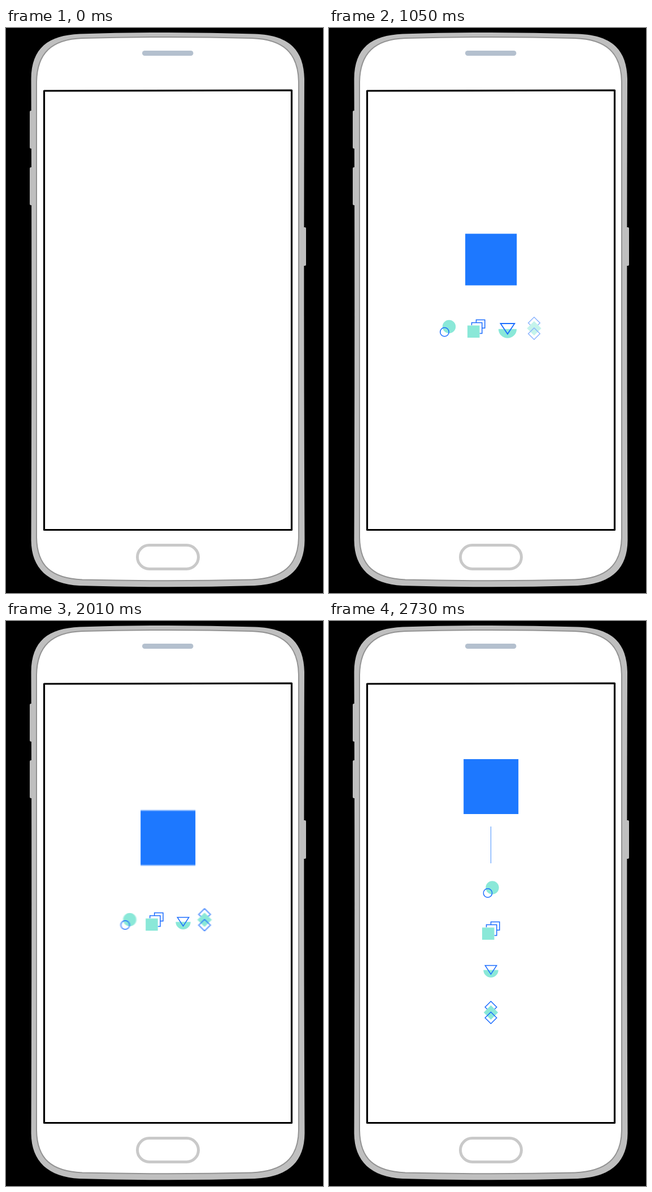
Recreate the animation shown at these times as an HTML page. Size 561 by 998 pixels, loop 3600 ms.

```html
<!DOCTYPE html>
<html lang="en">
<head>
<meta charset="utf-8">
<title>Phone intro</title>
<style>
html, body { margin: 0; width: 100%; height: 100%; overflow: hidden; background: #000; }
svg { display: block; width: 100vw; height: 100vh; }
.teal { fill: #8ae8d8; }
.line { fill: none; stroke: #1a6cff; stroke-width: 1.5; }
</style>
</head>
<body>
<svg viewBox="0 0 561 998">
  <g fill="#bfbfbf">
    <rect x="42" y="146" width="8" height="67" rx="2"/>
    <rect x="42" y="246" width="8" height="67" rx="2"/>
    <rect x="523" y="352" width="8" height="68" rx="2"/>
    <path d="M44.500 90C45 35 75 13 130 10.500Q287 5.500 440 10.500C497 12.500 527 35 528 90Q526.500 500 528.500 905C528 957 498 982 440 985Q287 989.500 130 985C75 982 45 955 44.500 905Q46 500 44.500 90Z"/>
  </g>
  <path fill="#fff" stroke="#929292" stroke-width="2" d="M54 95C55 45 80 20 135 18Q287 14 435 18C492 20 517 45 518 95V900C517 950 490 972 435 974.500Q287 978 135 974.500C80 972 55 950 54 900Z"/>
  <rect x="241" y="40" width="90.500" height="9" rx="4.500" fill="#b4c0ce"/>
  <rect x="232.500" y="913.500" width="108" height="42" rx="21" fill="#fff" stroke="#c9c9c9" stroke-width="5"/>
  <path d="M67.500 111L505.500 110V886.500H67.500Z" fill="#fff" stroke="#000" stroke-width="3.200" stroke-linejoin="round"/>

  <path id="stem" stroke="#4a93ff" stroke-width="1"/>
  <g id="mark"><rect x="-48.500" y="-48.500" width="97" height="97" fill="#1d78ff"/></g>

  <g id="icon3">
    <path class="line" d="M0 -19.800L10.300 -9.500L0 .8L-10.300 -9.500Z"/>
    <path class="teal" d="M0 -12.700L12.700 0L0 12.700L-12.700 0Z"/>
    <path class="line" d="M0 -.8L10.300 9.500L0 19.800L-10.300 9.500Z"/>
  </g>
  <g id="icon2">
    <path class="teal" d="M-13.200 1A13.200 13.200 0 0 0 13.200 1Z"/>
    <path class="line" d="M-10.200 -7H10.200L0 8.300Z"/>
  </g>
  <g id="icon1">
    <path class="line" d="M0 -10.500V-15H15.300V-.5H10.500M-8 -5.500V-10H10.300V9H6"/>
    <rect class="teal" x="-15.500" y="-5" width="21.500" height="21.500"/>
  </g>
  <g id="icon0">
    <circle class="teal" cx="2.500" cy="-3" r="11.700"/>
    <circle class="line" cx="-5.500" cy="6.500" r="7.700"/>
  </g>
</svg>
<script>
const LOOP = 3600, STEP = 30, END = 2730;
const MID = 286.5, ROW = 530.5;
const homeX = [210, 260.5, 316, 363];
const finalY = [474, 546.5, 615.5, 691.5];
const mergeStart = [1960, 1960, 1960, 1935];

const $ = id => document.getElementById(id);
const svg = document.querySelector('svg');
const ramp = (t, a, b) => Math.min(1, Math.max(0, (t - a) / (b - a)));
const smooth = (t, a, b) => { const u = ramp(t, a, b); return u * u * (3 - 2 * u); };
const mix = (a, b, p) => a + (b - a) * p;

function markAt(t) {
  const drift = 406 + 3 * ramp(t, 540, 1050) + 6 * smooth(t, 1110, 1560);
  return {
    x: MID + 0.2,
    y: mix(drift, 292.5, smooth(t, 1796, 2436)),
    scale: 1 - 0.06 * (smooth(t, 600, 1050) - smooth(t, 1050, 1260)),
    alpha: ramp(t, 30, 590)
  };
}

function iconAt(i, t) {
  const local = t - i * 285;
  const merge = smooth(t, mergeStart[i], 2240);
  const lift = i === 3 ? 6 * Math.sin(Math.PI * merge) : 0;
  return {
    x: mix(homeX[i], MID, merge),
    y: mix(ROW, finalY[i], smooth(t, 2230, 2640)) - lift,
    scale: 1 + 0.22 * (smooth(local, 300, 480) - smooth(local, 480, 660)),
    alpha: ramp(local, 95, 295)
  };
}

// Every moving part gets a blur that follows its speed.
function makePart(id, pose) {
  const ns = 'http://www.w3.org/2000/svg';
  const filter = document.createElementNS(ns, 'filter');
  const blur = document.createElementNS(ns, 'feGaussianBlur');
  const box = { id: id + 'Blur', x: '-30%', y: '-30%', width: '160%', height: '160%',
    'color-interpolation-filters': 'sRGB' };
  for (const key in box) filter.setAttribute(key, box[key]);
  filter.append(blur);
  svg.prepend(filter);
  return { el: $(id), id, pose, blur };
}

function place(part, t) {
  const p = part.pose(t), a = part.pose(t - 8), b = part.pose(t + 8);
  const bx = Math.abs(b.x - a.x) * 0.28, by = Math.abs(b.y - a.y) * 0.28;
  part.el.setAttribute('transform', `translate(${p.x} ${p.y}) scale(${p.scale})`);
  part.el.setAttribute('opacity', p.alpha);
  part.blur.setAttribute('stdDeviation', `${bx} ${by}`);
  if (bx + by > 0.15) part.el.setAttribute('filter', `url(#${part.id}Blur)`);
  else part.el.removeAttribute('filter');
}

const parts = [makePart('mark', markAt)];
homeX.forEach((_, i) => parts.push(makePart('icon' + i, t => iconAt(i, t))));

function draw(time) {
  const t = Math.min(END, Math.floor(time % LOOP / STEP) * STEP);
  parts.forEach(part => place(part, t));
  const grow = smooth(t, 2430, END);
  $('stem').setAttribute('d', `M${MID} 363V${363 + 65 * grow}`);
  $('stem').setAttribute('opacity', grow > 0 ? 1 : 0);
}

let start;
function tick(now) {
  if (start === undefined) start = now;
  draw(now - start);
  requestAnimationFrame(tick);
}
draw(0);
requestAnimationFrame(tick);
</script>
</body>
</html>
```
